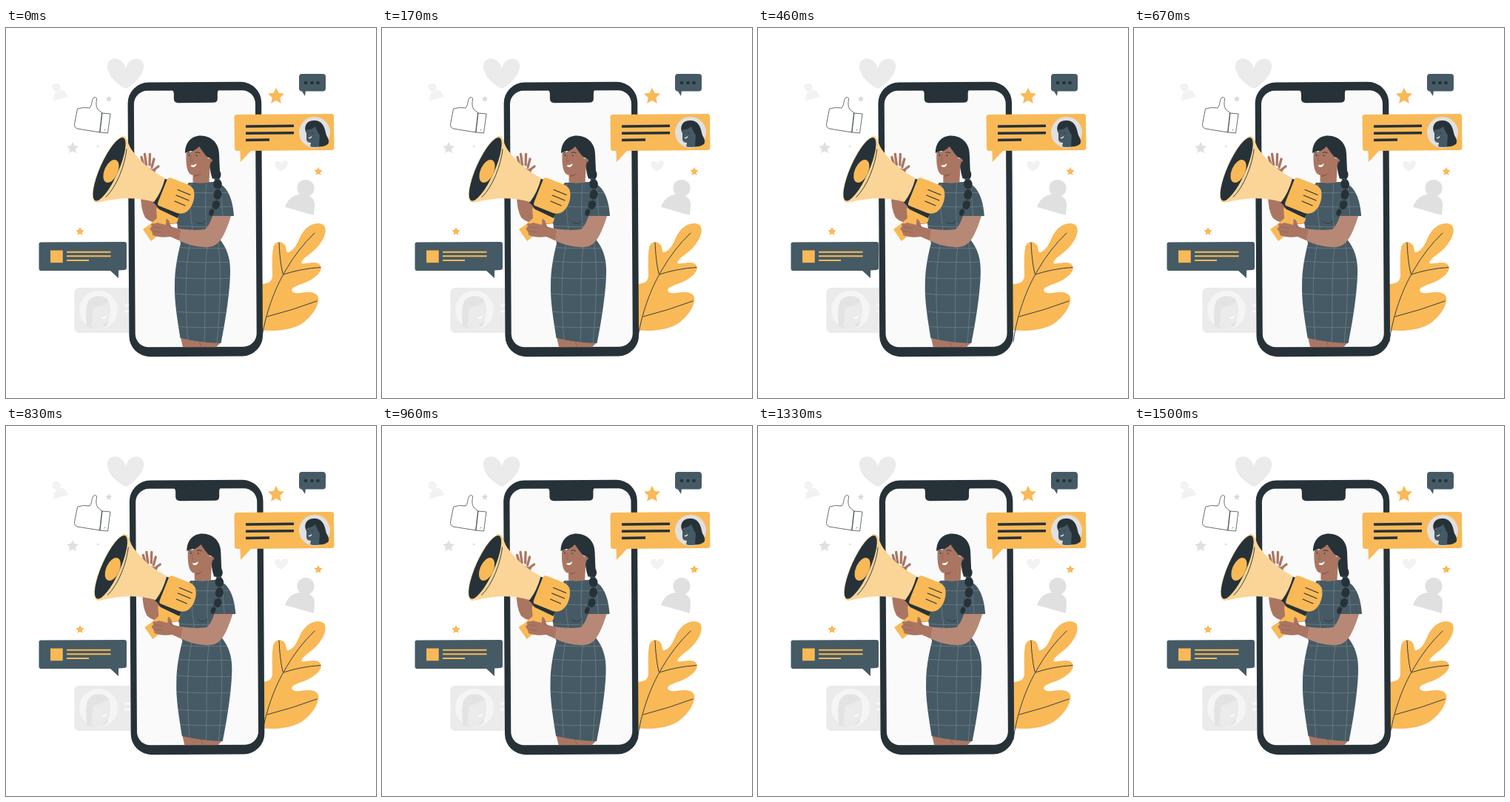
Write an HTML page with a canvas that moves like this. It is 500 px wide and 500 px high and loops after 1.54 s.

```html
<!DOCTYPE html>
<html lang="en">
<head>
<meta charset="utf-8">
<style>
  html, body { margin: 0; width: 100%; height: 100%; overflow: hidden; background: #fff; }
  canvas { display: block; width: 500px; height: 500px; }
</style>
</head>
<body>
<canvas id="stage"></canvas>
<script>
const canvas = document.getElementById('stage');
const ratio = window.devicePixelRatio || 1;
canvas.width = canvas.height = 500 * ratio;
const ctx = canvas.getContext('2d');
ctx.scale(ratio, ratio);
ctx.lineCap = ctx.lineJoin = 'round';

const INK = '#263238', SLATE = '#455a64', YELLOW = '#f9b957', CREAM = '#fbd597';
const ARM = '#b78876', SKIN = '#aa7662', CREASE = '#8d5f50';
const GREY = '#e0e0e0', PALE = '#ebebeb', FAINT = '#f2f2f2', CHECK = '#7d8c94';
const LOOP = 1540, STEP = 1000 / 24, SHAKE = 1500, LEAD = 27, REACH = 1.12;
const OFFSETS = [0, -1, 2, -4, 4, -4, 4, -4, 2, -1, 0];

const fill = (d, color) => { ctx.fillStyle = color; ctx.fill(new Path2D(d)); };
const line = (d, color = INK, width = 1) => {
  ctx.strokeStyle = color;
  ctx.lineWidth = width;
  ctx.stroke(new Path2D(d));
};
const oval = (x, y, rx, ry, color, tilt = 0) => {
  ctx.fillStyle = color;
  ctx.beginPath();
  ctx.ellipse(x, y, rx, ry, tilt, 0, 7);
  ctx.fill();
};
const dot = (x, y, r, color) => oval(x, y, r, r, color);
const box = (x, y, w, h, r, color) => {
  ctx.fillStyle = color;
  ctx.beginPath();
  ctx.roundRect(x, y, w, h, r);
  ctx.fill();
};
const star = (x, y, r, color) => {
  ctx.fillStyle = color;
  ctx.beginPath();
  for (let i = 0; i < 10; i++) {
    const a = i * Math.PI / 5 - Math.PI / 2, d = i % 2 ? r * 0.49 : r;
    ctx.lineTo(x + d * Math.cos(a), y + d * Math.sin(a));
  }
  ctx.fill();
};
const clipped = (path, draw) => {
  ctx.save();
  ctx.clip(path);
  draw();
  ctx.restore();
};

function shakeAt(ms) {
  const p = (ms / SHAKE % 1) * 10, i = Math.floor(p);
  return REACH * (OFFSETS[i] + (OFFSETS[i + 1] - OFFSETS[i]) * (p - i));
}

function drawIcons() {
  fill('M162 82C149 76 136 63 137 51C138 37 157 38 162 54C166 39 183 38 186 49C188 62 173 77 162 82Z', PALE);
  dot(68, 80, 5.6, FAINT);
  fill('M64 99C64 91 66 86 72 84C78 83 82 87 84 93Z', FAINT);
  line('M97 109Q104 106.5 113 108C117 104 115 97 119 94Q122 92.5 122.5 96C122 101 121 105 124 110L130 115L127 141L96 136Q92 134.5 92.5 130Z', INK, 0.7);
  line('M130 115L141 116L137.5 142L127 141ZM133 138L134 137', INK, 0.7);
  star(139, 96, 4.6, '#dadada');
  star(90, 162.3, 8.4, GREY);
  star(124, 160, 2, GREY);
  star(365, 92.3, 11.6, YELLOW);
  star(422, 194, 6, YELLOW);
  star(100, 275, 6, YELLOW);
  box(396, 62, 36, 23.5, 4, SLATE);
  fill('M399 84L404 92L405 84Z', SLATE);
  for (const x of [405, 413.5, 421.5]) dot(x, 74, 2.3, INK);
  fill('M371 194C366 191 363 187 363 183C364 178 370 179 372 183C374 178 380 178 381 182C381 187 377 191 371 194Z', FAINT);
  dot(405, 216.5, 11.6, GREY);
  fill('M377 242C381 231 388 225 399 225C412 225 418 231 417 241L416 253Z', GREY);
}

function drawLeaf() {
  fill('M340 408L342 346C353 346 360 344 360 334C360 322 359 308 361 297C363 287 375 287 378 296C379 301 379 304 382 303' +
    'C394 298 394 285 402 275C410 264 424 261 430 267C435 276 428 288 420 297C411 306 402 310 399 317' +
    'C401 321 412 315 422 318C428 322 427 329 418 336C408 345 392 347 387 352C384 357 390 359 398 358' +
    'C408 356 420 356 422 364C424 373 415 388 402 398C388 408 365 411 340 408Z', YELLOW);
  line('M345 424C350 386 364 351 377 329Q394 299 417 277M369 290Q370 315 374 332M375 333Q399 325 425 323.5M353 390Q388 381 420 369', INK, 0.9);
}

function drawGreyCard() {
  box(92.5, 351, 100, 61, 6, PALE);
  dot(125, 381, 26, '#f5f5f5');
  fill('M109 404C108 390 107 373 113 367C122 359 137 362 139 371L141 380L138 400Q130 410 109 404Z', '#e3e3e3');
  fill('M118 378Q132 375 138 370C141 383 141 394 137 398Q132 400 131 399L132 405Q122 408 115 403Z', '#ebebeb');
  line('M130 391Q133 393 135 390', '#fff', 1.5);
  line('M161 375H180M161 383H180', '#f7f7f7', 3);
}

function drawPhone() {
  ctx.save();
  ctx.translate(255.8, 258.5);
  ctx.rotate(-0.0058);
  box(-90.3, -185.3, 180.6, 370.6, 28, INK);
  box(-82, -174, 164, 346.5, 18, '#fafafa');
  fill('M-32 -176H34Q31 -174 31 -170V-163Q31 -157.5 25 -157.5H-22Q-28 -157.5 -28 -163V-170Q-28 -174 -32 -176Z', INK);
  ctx.restore();
}

function drawDress() {
  const dress = new Path2D('M247 209L281 208C296 210 306 225 308 254L279 255Q278 273 290 287C299 299 303 311 303 328' +
    'C303 356 296 399 290.5 426Q261 425 235.5 419C232 396 227 369 228 345C228 327 232 306 236 291Q232 276 231 262L234 226Z');
  ctx.fillStyle = SLATE;
  ctx.fill(dress);
  clipped(dress, () => {
    for (const y of [222, 241, 268, 297, 316, 338, 360, 384, 404])
      line(`M225 ${y - 1}Q262 ${y + 2} 312 ${y}`, CHECK, 0.6);
    line('M250 208Q247 245 252 270L248 295C242 325 242 375 246 424', CHECK, 0.6);
    line('M271 208Q268 240 271 270L272 295C267 335 270 380 268 427', CHECK, 0.6);
    line('M290 209Q291 235 293 256M285 280Q294 325 285 427', CHECK, 0.6);
  });
  line('M279 255Q277 245 280 234M257 262Q264 267 270 261', INK, 0.7);
}

function drawHead() {
  fill('M252.5 192L276 180L274.5 208Q264 211 252.5 208.5Z', SKIN);
  fill('M254 198.5Q262 197.5 267 193Q262 200 254 201Z', CREASE);
  fill('M242 169C242 154 251 145.5 263 145.5C278 146 288 156 288 171L289 196L279 204Q274 190 276 176L250 166Z', INK);
  fill('M243.5 169Q255 167 261 160Q267 169 273.5 176.5C278 175 281 180 279 184Q277 187.5 273.5 186.5C270 194 260 200 251 198.5C244 196 243 182 243.5 169Z', SKIN);
  line('M245 168.8L248 168M256 168.3Q259 166.8 262 168.8', INK, 0.9);
  dot(247.5, 172, 0.9, INK);
  dot(257.5, 172.3, 0.9, INK);
  line('M251 172L249 179Q250 181 252 180', CREASE, 0.8);
  fill('M249.5 185.5Q254 186 257.5 183Q257 188 252.5 188Q250 187.5 249.5 185.5Z', '#fff');
  line('M278 179Q275 180 276 183', CREASE, 0.8);
  line('M276 184.5Q279 188 280 184', CREAM, 1);
  oval(282, 188, 6.3, 9, INK, -0.2);
  oval(284.5, 198, 6, 7.5, INK);
  oval(286, 211, 5.8, 7, INK, -0.2);
  oval(286, 225, 5.5, 7, INK, 0.2);
  oval(284, 239, 4.8, 6.2, INK, 0.3);
  oval(277.7, 249, 3.2, 5, INK, 0.4);
  line('M281 203L289 205M281 217L290 218M280 232L288 233M278 244L283 246', SLATE, 0.9);
}

function drawBackArm() {
  fill('M181 192Q180 181 185 182L193 189Q200 192 203 190L197 208L206 232L236 250L233 264C214 267 195 264 188 256Q182 245 182 225Z', SKIN);
  line('M186 185L183 174.5M189.5 185L187.5 170.5M194 185L194.5 170.5M197 188L200 177M198 193L206 187', SKIN, 3.3);
}

function drawMegaphone() {
  fill('M203 243L233 254Q233 263 229 264L217 265Q211 277 196 288L185 272Q196 265 204 257Z', YELLOW);
  fill('M200 236L206 238L234 251L232 257L207 245Z', INK);
  fill('M212.5 203L219 205L207 242L199 236Z', INK);
  fill('M218 204Q220 201 224 203L247 212Q255 216 254.5 226C254 238 248 246 243 249Q238 252 231 250L206 240Q204 239 206 234Z', YELLOW);
  line('M232 218.5L249 225.5M230 226L247 233M228 234L242 240', INK, 1.1);
  fill('M156 146Q161 145 164 151Q166 161 174 170C185 184 200 195 215 203Q210 222 200 235C177 228 151 229 126 235.5Q119 237 118 232Z', CREAM);
  oval(140.3, 191, 48.5, 13.7, CREAM, -1.15);
  oval(139.6, 190.8, 46.5, 12.3, INK, -1.15);
  const mouth = new Path2D();
  mouth.ellipse(139.6, 190.8, 46.5, 12.3, -1.15, 0, 7);
  clipped(mouth, () => oval(142, 193.5, 16.5, 9, YELLOW, -1.15));
  line('M163 164C161 184 150 214 135 228.5', INK, 0.9);
}

function drawFrontArm() {
  fill('M279 254L304 254C300 267 294 283 287 290C282 295 275 297 267 296C250 295 238 290 222 281L220 268' +
    'Q246 275 269 272Q275 267 279 254Z', ARM);
  fill('M224 269L236 272L234 287L222 282Q208 284 199 280L195 271Q198 265 204 263L216 266L216.5 258Q220.5 258 222 266Z', SKIN);
  line('M198 266L211 268M196.5 271.5L210 274M200 278.5L211 279', SKIN, 4);
  line('M199 268.7L210 270.5M199 274.7L209 276.3M218 265Q220 269 224 270', CREASE, 0.7);
}

function drawSpeaker() {
  fill('M236 418L290 425L284 431.3H239Z', SKIN);
  line('M261 423L264 431', CREASE, 0.8);
  drawBackArm();
  drawDress();
  drawHead();
  drawMegaphone();
  drawFrontArm();
}

function drawYellowBubble() {
  fill('M312 117L440 116Q443 116 443 119L443.5 162Q443.5 165 440 165L331 166L317 181L316.5 166L312 166Q309 166 309 163L308.5 120Q309 117 312 117Z', YELLOW);
  ctx.lineCap = 'butt';
  line('M324 133L389 132.2M324 142.3L389 141.7M324 151.4L356 151', INK, 3.5);
  ctx.lineCap = 'round';
  dot(417, 141, 21, GREY);
  fill('M405 140C402 130 409 124 418 125C429 126 431 136 433 145Q438 153 435 157Q428 162 416 160L405 140Z', INK);
  fill('M406 138Q414 137 418 133Q421 141 424 145L423 160Q416 162 411 160L412 155Q407 155 406 151Z', SLATE);
  line('M409.5 148.5Q411.5 149 412.5 147', '#fff', 1.3);
  dot(408.5, 142, 0.8, INK);
  dot(414, 142, 0.8, INK);
}

function drawSlateBubble() {
  fill('M47 289.5L160 289Q163 289 163 292V324Q163 327 160 327L152 327.5V338L141 328H47Q44.5 328 44.5 325V292Q44.5 289.5 47 289.5Z', SLATE);
  box(60, 300.5, 16.7, 16.7, 0, YELLOW);
  ctx.lineCap = 'butt';
  line('M82 302.7H141.5M82 308.2H141.5M82 314H112', YELLOW, 2.1);
  ctx.lineCap = 'round';
}

function render(now) {
  const step = Math.min(36, Math.floor((now % LOOP + 5) / STEP));
  const shift = shakeAt(step * STEP + LEAD) - shakeAt(LEAD);
  ctx.fillStyle = '#fff';
  ctx.fillRect(0, 0, 500, 500);
  drawIcons();
  drawLeaf();
  drawGreyCard();
  ctx.save();
  ctx.translate(shift, 0);
  drawPhone();
  drawSpeaker();
  ctx.restore();
  drawYellowBubble();
  drawSlateBubble();
}

function tick() {
  render(performance.now());
  requestAnimationFrame(tick);
}
tick();
</script>
</body>
</html>
```
